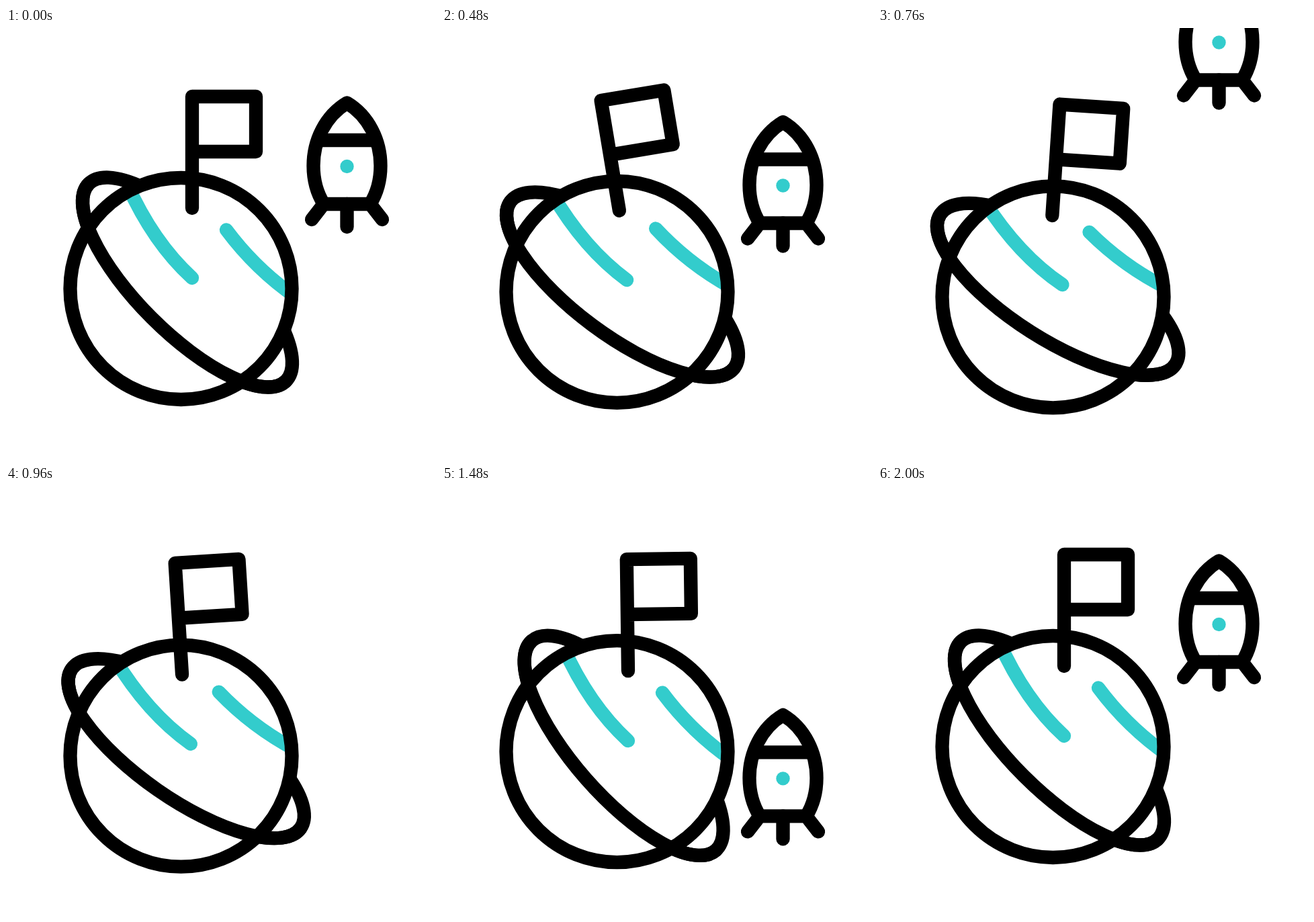
An HTML page with a canvas for the animation above (2040 ms loop, 640 by 640 pixels).

```html
<!DOCTYPE html>
<html lang="en">
<head>
<meta charset="utf-8">
<title>Planet and rocket</title>
<style>
  html, body { margin: 0; width: 100%; height: 100%; overflow: hidden; background: #fff; }
  canvas { display: block; width: 100vw; height: 100vh; }
</style>
</head>
<body>
<canvas id="stage" width="640" height="640"></canvas>
<script>
const ctx = document.getElementById('stage').getContext('2d');
const LOOP = 2040, STEP = 40;
const INK = '#000', TEAL = '#33cccc';
const DEG = Math.PI / 180;
const PLANET = { x: 260.5, y: 388, r: 165 };

// 0 before `from`, 1 after `to`, smooth in between.
function ease(t, from, to) {
  const s = Math.min(1, Math.max(0, (t - from) / (to - from)));
  return s * s * (3 - 2 * s);
}

const bob = t => 13.7 * (ease(t, 200, 900) - ease(t, 1140, 1840));
const spin = t => -8.4 * (ease(t, 0, 720) - ease(t, 800, 1440));
const ringTurn = t => -12.6 * ease(t, 100, 720) + 16.6 * ease(t, 830, 1370) - 4 * ease(t, 1400, 1920);
const flagTilt = t => -9.5 * ease(t, 0, 470) + 13.4 * ease(t, 470, 770)
  - 7.7 * ease(t, 770, 980) + 3.8 * ease(t, 980, 1680);

// Dips, shoots off the top, then coasts back in from below.
function rocketShift(t) {
  if (t < 480) return 28.5 * ease(t, 0, 480);
  if (t < 1040) return 28.5 - 213 * ((t - 480) / 280) ** 2;
  return 447 * (Math.max(0, 2000 - t) / 720) ** 2.05;
}

function line(d, color = INK) {
  ctx.strokeStyle = color;
  ctx.stroke(new Path2D(d));
}

function circle(x, y, r) {
  ctx.beginPath();
  ctx.arc(x, y, r, 0, 2 * Math.PI);
}

function disc(x, y, r, color) {
  circle(x, y, r);
  ctx.fillStyle = color;
  ctx.fill();
}

function turned(angle, x, y, draw) {
  ctx.save();
  ctx.translate(x, y);
  ctx.rotate(angle * DEG);
  ctx.translate(-x, -y);
  draw();
  ctx.restore();
}

function ring(angle, end) {
  const { x, y } = PLANET;
  turned(angle, x, y, () => {
    ctx.beginPath();
    ctx.ellipse(x + 9.5, y - 9.5, 207.5, 75, 45 * DEG, 0, end);
    ctx.strokeStyle = INK;
    ctx.stroke();
  });
}

function stripes(angle) {
  const { x, y, r } = PLANET;
  ctx.save();
  circle(x, y, r);
  ctx.clip();
  turned(angle, x, y, () => {
    line('M180 232 Q219 319 277 372', TEAL);
    line('M328 300.5 Q372 359.5 432 401', TEAL);
  });
  ctx.restore();
}

function planet(t) {
  const { x, y, r } = PLANET;
  const turn = ringTurn(t), surface = spin(t);
  ctx.save();
  ctx.translate(0, bob(t));
  ring(turn, 2 * Math.PI);
  disc(x, y, r, '#fff');
  stripes(surface);
  circle(x, y, r);
  ctx.strokeStyle = INK;
  ctx.stroke();
  ring(turn, Math.PI);
  // The pole's foot follows the surface; the flag sways on its own.
  turned(surface, x, y, () => turned(flagTilt(t) - surface, 277, 268, () => {
    line('M277 268 V102 H372 V184 H277');
  }));
  ctx.restore();
}

function rocket(t) {
  ctx.save();
  ctx.translate(0, rocketShift(t));
  line('M507.5 111.5 C475 131 457.5 168 457.5 205 C457.5 225 463 246 473 262 H542 ' +
       'C552 246 557.5 225 557.5 205 C557.5 168 540 131 507.5 111.5 Z');
  line('M469 167 H546 M469 267 L455 285 M546 267 L560 285 M507.5 262 V296');
  disc(507.5, 206, 10.2, TEAL);
  ctx.restore();
}

function frame(now) {
  const t = Math.floor((now % LOOP) / STEP) * STEP;
  const pose = t < 2 * STEP ? 0 : t;
  ctx.fillStyle = '#fff';
  ctx.fillRect(0, 0, 640, 640);
  ctx.lineWidth = 20.3;
  ctx.lineCap = ctx.lineJoin = 'round';
  planet(pose);
  rocket(pose);
}

const start = performance.now();
function tick() {
  frame(performance.now() - start);
  requestAnimationFrame(tick);
}
tick();
</script>
</body>
</html>
```
